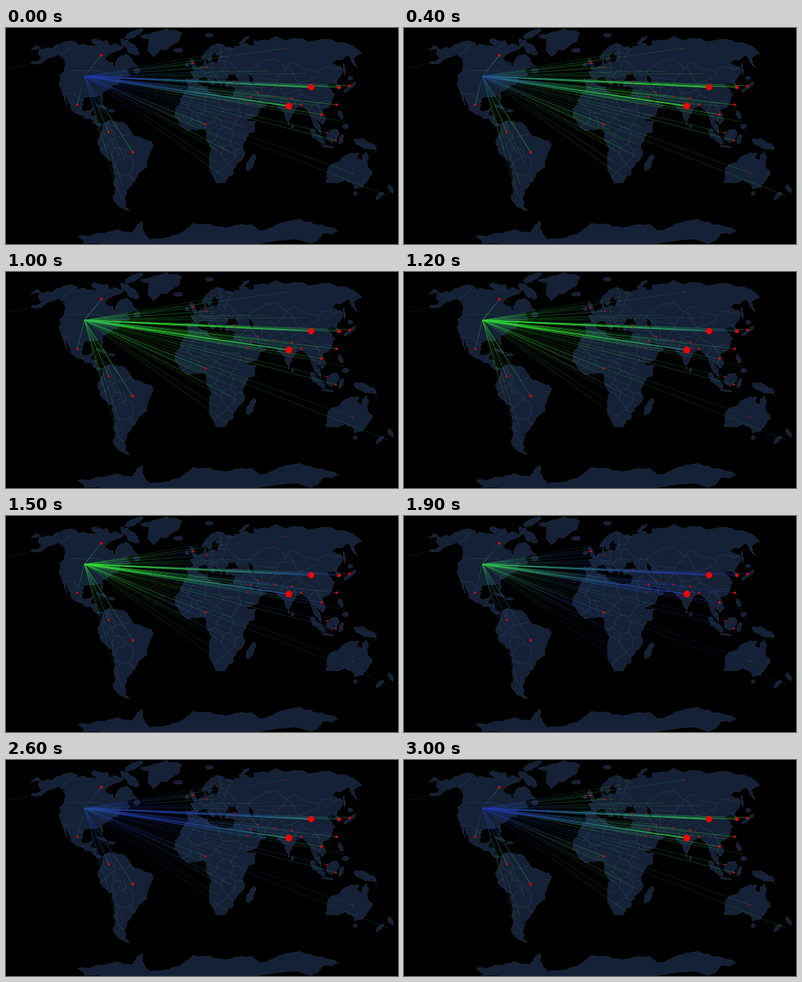
Recreate the animation shown at these times as a matplotlib script. Size 600 by 332 pixels, loop 3100 ms.

```python
import numpy as np
import matplotlib.pyplot as plt
from matplotlib.animation import FuncAnimation
from matplotlib.collections import LineCollection, PolyCollection
from matplotlib.path import Path

W, H, DPI = 600, 332, 100
PX = 72 / DPI
FRAMES, STEP_MS, PERIOD_MS = 31, 100, 3000
LAND, EDGE, RED = "#142136", "#34445a", "#ff0000"
BLUE = np.array([0.13, 0.22, 0.66])
GREEN = np.array([0.20, 0.87, 0.20])
ORIGIN = np.array([120, 74])
rng = np.random.default_rng(4)


def project(flat):
    """Robinson projection as polynomials, in stage pixels."""
    lon, lat = np.radians(np.reshape(flat, (-1, 2)).astype(float)).T
    x = 290 + 124.2 * lon * (0.8507 - 0.145 * lat**2 - 0.0104 * lat**4)
    y = 167 - 124.2 * (0.9642 * lat - 0.0013 * lat**3 - 0.0129 * lat**5)
    return np.column_stack([x, y])


def roughen(pts, amount, rounds=4):
    """Break long edges at slightly shifted midpoints."""
    for _ in range(rounds):
        out = [pts[0]]
        for a, b in zip(pts, pts[1:]):
            d = b - a
            if np.hypot(*d) > 2.5:
                out.append((a + b) / 2 + rng.normal(0, amount) * np.array([-d[1], d[0]]))
            out.append(b)
        pts = np.array(out)
    return pts


def coast(flat):
    pts = project(flat)
    return roughen(np.vstack([pts, pts[:1]]), 0.1)


def island(lon, lat, length, width, angle):
    turn = np.linspace(0, 2 * np.pi, 13)
    u, v = length / 2 * np.cos(turn), width / 2 * np.sin(turn)
    c, s = np.cos(np.radians(angle)), np.sin(np.radians(angle))
    pts = project([lon, lat]) + np.column_stack([u * c - v * s, u * s + v * c])
    return roughen(pts, 0.16)


def cell_walls(seeds, owner):
    """Walls between nearest-seed cells of different owners."""
    walls = []
    norm = (seeds**2).sum(axis=1)
    for i, a in enumerate(seeds):
        for j in range(i + 1, len(seeds)):
            if owner[i] == owner[j]:
                continue
            mid = (a + seeds[j]) / 2
            d = np.array([a[1] - seeds[j][1], seeds[j][0] - a[0]])
            d = d / np.hypot(*d)
            slope = 2 * (a - seeds) @ d
            limit = norm[i] - norm - 2 * (a - seeds) @ mid
            up, down = slope > 1e-6, slope < -1e-6
            lo = max([-50, *(limit[up] / slope[up])])
            hi = min([50, *(limit[down] / slope[down])])
            if lo < hi:
                walls.append(roughen(np.array([mid + lo * d, mid + hi * d]), 0.1))
    return walls


NORTH_AMERICA = [-168, 66, -156, 71, -128, 70, -110, 68, -95, 71, -82, 69, -87, 64,
                 -94, 59, -82, 55, -79, 51, -78, 61, -73, 62, -66, 59, -56, 52, -66, 50,
                 -61, 46, -70, 43.5, -76, 36, -81, 31, -80.5, 25, -83, 30, -94, 29.6,
                 -97.5, 25, -96, 19, -91, 18.8, -87, 21.4, -88.5, 16, -83.3, 15,
                 -83, 10, -77.4, 8.5, -80.5, 7.5, -87.6, 13, -96, 15.8, -105.5, 20,
                 -114, 31.5, -110, 23, -117, 32.6, -124, 40, -124.6, 48.4, -134, 58.3,
                 -146, 61, -152, 59, -164, 54.6, -158, 58.7, -165, 61.5]
EUROPE = [28, 41.5, 24, 40.5, 22.5, 36.6, 19.4, 42, 13, 45.5, 18, 40, 16, 38, 9, 44.4,
          3, 43, -1, 37, -6, 36, -9, 43, -1.5, 43.4, -4.5, 48.3, 8.5, 53.7, 10, 57.5,
          12, 54, 21, 55, 23.5, 59.2, 29, 60, 21.5, 61, 25, 65.5, 17.5, 61.5, 16, 56.5,
          12.8, 56, 11, 59, 6, 58.5, 11, 64.5, 26, 71, 41, 67, 34, 66.5, 44, 66.2,
          44, 68.5, 67, 69]
ASIA = [70, 73, 81, 73.6, 104, 77.6, 113, 74, 140, 72.5, 180, 69, 177, 62.5, 163, 59,
        157, 51, 160, 61, 136, 55, 140, 48.5, 128, 40, 129, 35.5, 126, 35, 125, 39.5,
        118, 39, 122, 31, 114, 22.3, 107, 20, 109, 12, 105, 9, 100.5, 13, 103.9, 1.4,
        98.5, 8, 97, 16.5, 91.5, 22.5, 87, 21.5, 80, 14, 77.5, 8, 73, 20, 67, 25,
        57, 26.5, 48, 30, 51.5, 24.5, 56.3, 26, 59.8, 22.5, 52, 15.6, 43.3, 12.8,
        35, 29, 33, 30.5, 36, 36, 27, 37, 28, 41, 41, 41.5, 38, 47, 31, 46.5]
AFRICA = [-6, 35.8, -13, 27.7, -17, 21, -17.4, 14.7, -13, 9, -7.5, 4.4, 5, 6, 9.5, 4,
          9, -1, 13.5, -9, 11.8, -16, 18.4, -34.2, 26, -34, 32.8, -27, 35, -20,
          40.5, -15, 39, -6.5, 42, -1.8, 51, 11.8, 43.5, 11.5, 37, 20, 33, 30,
          20, 30.8, 15.5, 32, 11, 33.5, 10.5, 37]
SOUTH_AMERICA = [-77.4, 8.5, -72, 12, -62, 10.7, -50, 0, -35, -6, -39, -14,
                 -41.5, -22.5, -48, -26, -57, -36, -62, -39, -67, -46, -68.5, -52.5,
                 -66, -55, -74, -52.5, -73, -40, -70.3, -18.5, -76.2, -14, -81, -5, -78, 2]
AUSTRALIA = [114, -22, 115.5, -34, 123.5, -34, 131, -31.5, 138, -34, 144, -38.7,
             150, -37.3, 153, -28, 145.5, -15, 142.5, -10.8, 140, -17.5, 135.5, -15,
             136.5, -12, 131, -12, 122, -18]
ANTARCTICA = [-160, -84, -150, -77, -120, -73.8, -75, -73, -67, -68, -57, -63.3,
              -62, -70, -62, -74, -60, -80, -28, -76, -12, -71, 33, -69, 55, -66.5,
              70, -69.5, 90, -66.5, 130, -66, 160, -69.5, 170, -72, 166, -84]
GREENLAND = [-44, 60, -52, 65, -54, 70, -58, 75.5, -71, 77.5, -55, 82, -30, 83.5,
             -18, 81, -21, 72, -38, 66]
# lon, lat, length, width, angle
ISLANDS = [(-74, 68, 36, 12, 40), (-110, 71, 22, 9, 0), (-121, 73, 10, 7, 0),
           (-82, 80, 30, 9, -25), (18, 78.5, 12, 6, 0), (59, 73.7, 20, 4, -40),
           (-19, 65, 14, 6, 0), (-2, 54, 19, 7, 65), (-8, 53.3, 7, 6, 0),
           (-56, 49, 10, 8, 0), (-79.5, 21.8, 19, 3, 18), (-71, 19, 11, 4, 0),
           (47, -19, 28, 9, -65), (80.8, 7.5, 6, 4, 90), (101.5, 0, 32, 7, 45),
           (110, -7.2, 18, 3, 8), (114, 1, 22, 16, -45), (121, -2, 16, 6, -70),
           (141, -5.5, 37, 11, 22), (122, 16, 14, 6, 70), (125, 7.5, 9, 7, 0),
           (138, 36.5, 24, 5, -40), (143, 43.3, 8, 6, 0), (143, 50, 18, 3, 85),
           (146.5, -42, 6, 6, 0), (176, -38.5, 14, 6, 60), (170.5, -43.8, 16, 6, -45)]

old_world = [coast(EUROPE + ASIA), coast(AFRICA), coast(SOUTH_AMERICA)]
lands = old_world + [coast(c) for c in (NORTH_AMERICA, AUSTRALIA, ANTARCTICA, GREENLAND)]
lands += [island(*row) for row in ISLANDS]
lands.append(coast([-180, 69, -170, 66, -180, 65]))
caspian = island(51, 42, 20, 6, 70)

# target x, y, line width
MAIN = [(467, 91, 2), (433, 120, 2.2), (510, 91, 1.1), (526, 89, .8), (506, 118, .8),
        (483, 133, .8), (194, 191, .8), (146, 42, .8), (109, 118, .7), (157, 160, .7),
        (305, 148, .7), (452, 118, .6), (438, 108, .6), (286, 54, .6), (307, 60, .5),
        (505, 173, .6), (428, 31, .4), (386, 99, .5), (370, 117, .5), (350, 84, .5),
        (374, 106, .5), (412, 105, .5), (491, 161, .5), (530, 223, .4)]
MINOR = [178, 241, 169, 245, 153, 186, 146, 172, 173, 195, 169, 154, 184, 206, 144, 152,
         151, 130, 293, 72, 284, 84, 311, 79, 317, 46, 330, 38, 277, 57, 333, 75,
         321, 60, 342, 66, 400, 66, 458, 70, 344, 112, 321, 114, 288, 152, 264, 139,
         279, 101, 295, 109, 345, 138, 362, 152, 354, 178, 334, 172, 322, 187, 341, 190,
         337, 231, 321, 206, 355, 197, 313, 156, 582, 257, 517, 144, 494, 121, 473, 135,
         398, 92]
MINOR = np.reshape(MINOR, (-1, 2))
# further centres of the widest countries, with their row in MAIN
WIDE = np.array([(352, 48, 16), (390, 42, 16), (465, 52, 16), (500, 48, 16), (545, 28, 16),
                 (432, 90, 0), (492, 106, 0), (497, 76, 0),
                 (176, 178, 6), (212, 178, 6), (203, 212, 6)])

main = np.array(MAIN)
seeds = np.vstack([main[:, :2], MINOR, WIDE[:, :2]])
owner = [*range(len(main) + len(MINOR)), *WIDE[:, 2]]
walls = cell_walls(seeds, owner)
american = [roughen(project(b), 0.04) for b in (
    [-141, 69.6, -141, 60.3, -130, 55.5],
    [-95, 49, -83, 46, -82.5, 42.5, -75, 45, -70, 46, -67, 45],
    [-117, 32.5, -106.5, 31.7, -103, 29, -97.5, 26])]
american.append(project([-123, 49, -95, 49]))

targets = [(x, y, w, 0.35 + 0.35 * min(w, 1.4)) for x, y, w in MAIN]
targets += [(x, y, 0.5, 0.4) for x, y in MINOR]

PIECES = 24
cuts = np.linspace(0, 1, PIECES + 1)
segments, widths, alphas = [], [], []
for x, y, w, a in targets:
    pts = ORIGIN + cuts[:, None] * (np.array([x, y]) - ORIGIN)
    segments += list(np.stack([pts[:-1], pts[1:]], axis=1))
    widths += [w * PX] * PIECES
    alphas += [a] * PIECES
along = np.tile((cuts[:-1] + cuts[1:]) / 2, len(targets))
alphas = np.array(alphas)[:, None]

fig = plt.figure(figsize=(W / DPI, H / DPI), dpi=DPI, facecolor="black")
ax = fig.add_axes([0, 0, 1, 1])
ax.set_xlim(0, W)
ax.set_ylim(H, 0)
ax.axis("off")

ax.add_collection(PolyCollection(lands, facecolors=LAND, edgecolors=EDGE,
                                 linewidths=0.35 * PX, zorder=1))
inner = LineCollection(walls, colors=EDGE, linewidths=0.55 * PX, zorder=2)
ax.add_collection(inner)
inner.set_clip_path(Path.make_compound_path(*map(Path, old_world)), ax.transData)
ax.add_collection(LineCollection(american, colors=EDGE, linewidths=0.55 * PX, zorder=2))
ax.add_collection(PolyCollection([caspian], facecolors="black", edgecolors=EDGE,
                                 linewidths=0.35 * PX, zorder=2.5))

# small islands
chain = np.linspace(0, 1, 9)
specks = np.vstack([np.column_stack([8 + 24 * chain, 60 - 5 * chain**2]),
                    np.column_stack([550 + 18 * chain, 176 + 15 * chain]),
                    [(8, 122), (11, 126), (36, 189), (124, 170), (393, 212), (402, 272)]])
ax.scatter(*specks.T, s=(1.3 * PX) ** 2, c="#223048", linewidths=0, zorder=2)

rays = LineCollection(segments, linewidths=widths, capstyle="butt", zorder=3)
ax.add_collection(rays)

ax.scatter(main[:, 0], main[:, 1], s=(4.8 * main[:, 2] * PX) ** 2, c=RED,
           linewidths=0, zorder=4)
ax.scatter(*MINOR.T, s=(1.3 * PX) ** 2, c=RED, alpha=0.6, linewidths=0, zorder=4)


def update(i):
    """Run a wave of green from the targets back to the origin."""
    phase = i * STEP_MS / PERIOD_MS - 0.5 + 0.4 * along
    g = (0.5 + 0.5 * np.cos(2 * np.pi * phase))[:, None]
    rays.set_color(np.hstack([BLUE + g * (GREEN - BLUE), alphas]))
    return [rays]


anim = FuncAnimation(fig, update, frames=FRAMES, interval=STEP_MS, repeat=True,
                     repeat_delay=0, blit=False)
plt.show()
```
